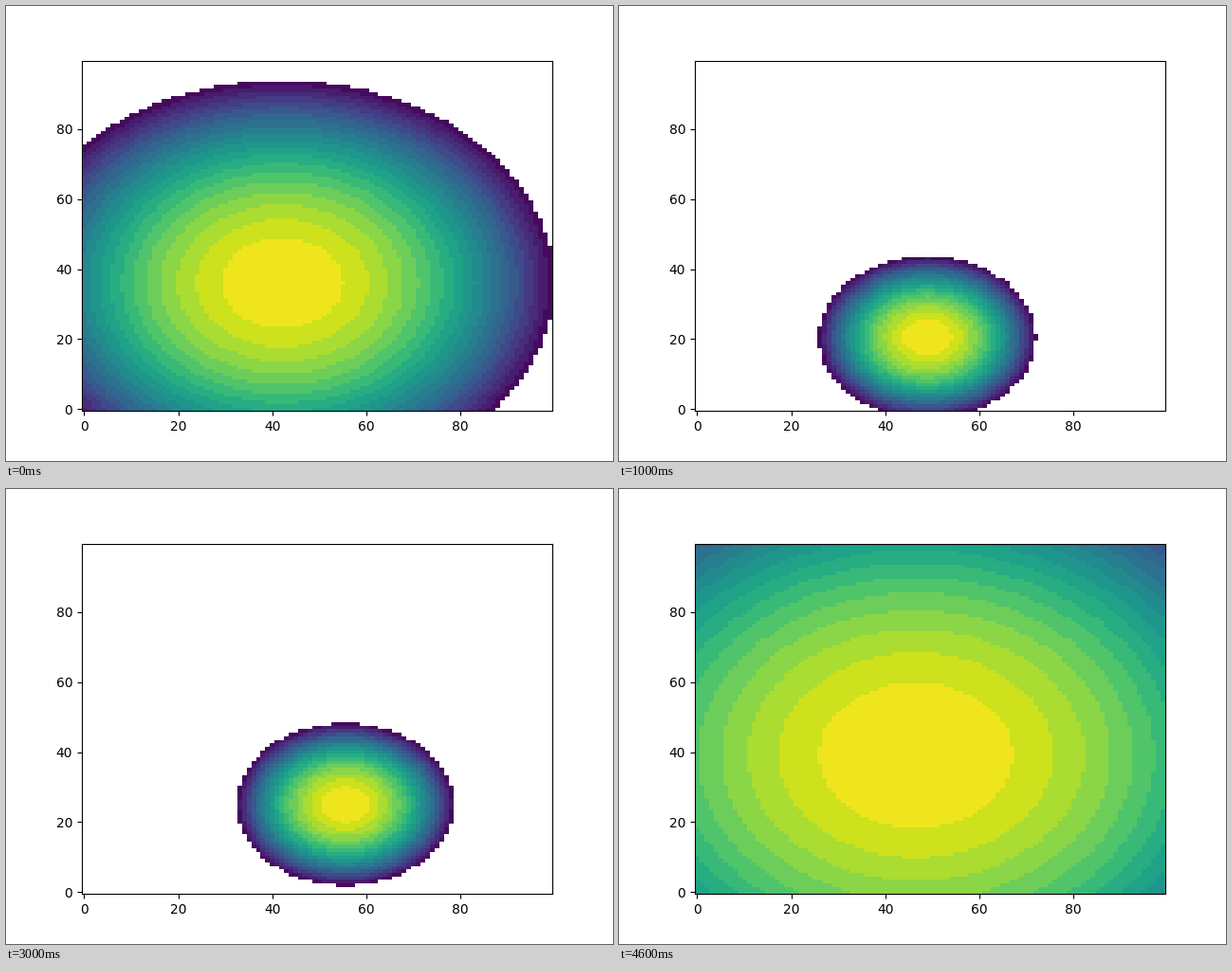
A matplotlib script for the animation above (5 s loop, 640 by 480 pixels).

```python
import numpy as np
import matplotlib.pyplot as plt
from matplotlib.animation import FuncAnimation

SIZE = 100
LEVELS = 20
UNIT_AREA = 535.35  # squared radius of a spot of scale 1

# centre x, centre y, scale
SPOTS = [
    (42.1, 36.0, 2.5),
    (48.9, 20.45, 1),
    (38.5, 25.0, 1.5),
    (55.5, 25.04, 1),
    (46.5, 39.1, 4),
]

rows, cols = np.mgrid[:SIZE, :SIZE]
edges = np.arange(SIZE + 1) - 0.5


def spot(cx, cy, scale):
    """Stepped parabolic depth below the peak, masked outside the rim."""
    depth = ((cols - cx) ** 2 + (rows - cy) ** 2) / (UNIT_AREA * scale ** 2)
    steps = (np.floor(depth * LEVELS) + 0.5) / LEVELS
    return np.ma.masked_where(depth >= 1, steps)


fig, ax = plt.subplots(figsize=(6.4, 4.8), dpi=100)
mesh = ax.pcolormesh(edges, edges, spot(*SPOTS[0]), cmap="viridis_r",
                     vmin=0, vmax=1)


def update(i):
    mesh.set_array(spot(*SPOTS[i]))
    return [mesh]


anim = FuncAnimation(fig, update, frames=len(SPOTS), interval=1000,
                     repeat=True, repeat_delay=0)
plt.show()
```
